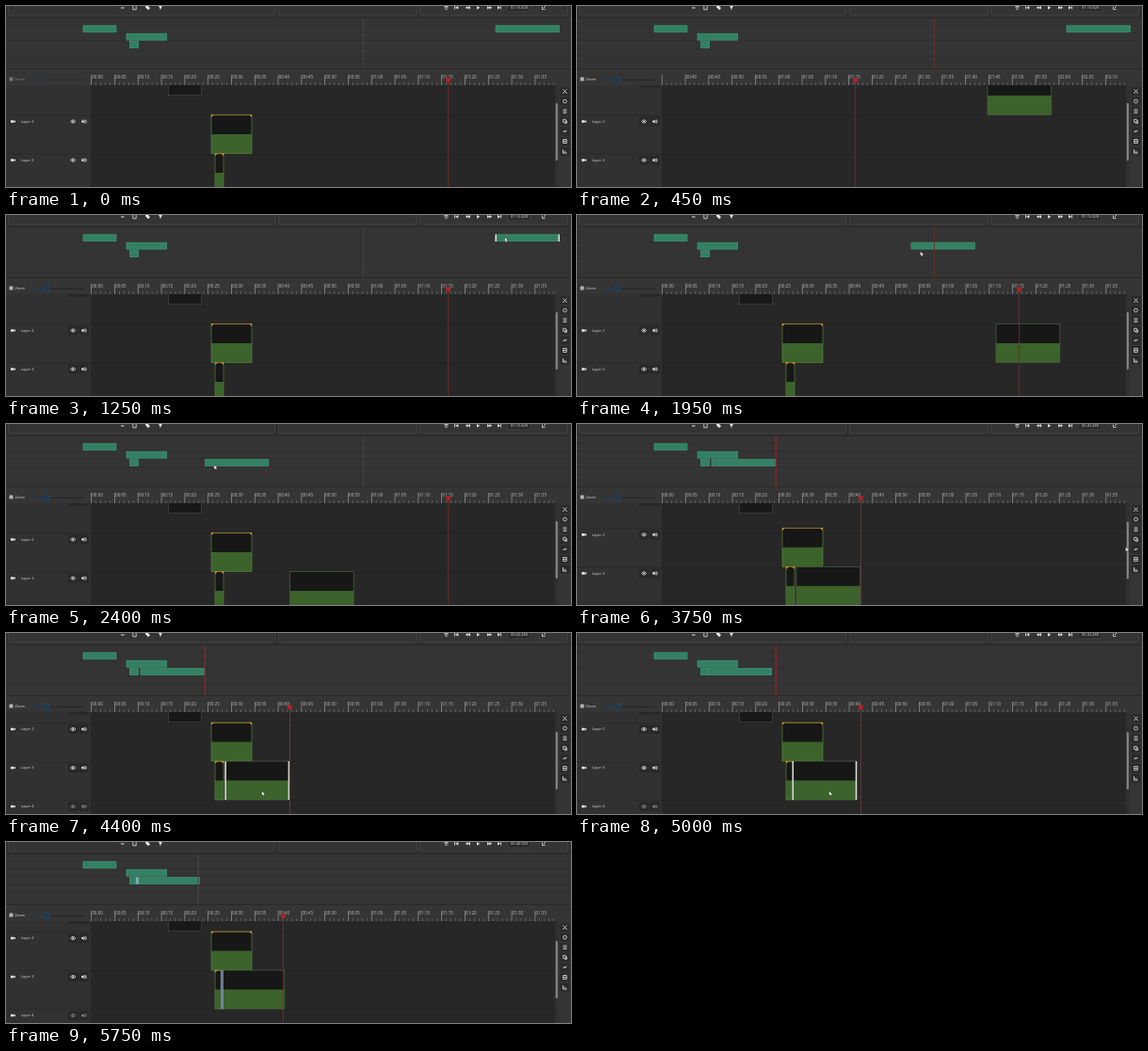
An HTML page that plays this animation: 600 by 192 pixels, repeating every 5850 ms.

```html
<!DOCTYPE html>
<html lang="en">
<head>
<meta charset="utf-8">
<title>Timeline editor</title>
<style>
  html, body { margin: 0; width: 100%; height: 100%; overflow: hidden; background: #353535; }
  svg { display: block; width: 600px; height: 192px; }
  text { font-family: "Open Sans", "Noto Sans", sans-serif; fill: #d8d8d8; font-size: 4px; }
  .tick { font-size: 4.5px; fill: #bdbdbd; }
  .icon { fill: #e4e4e4; }
  .line { fill: none; stroke: #e4e4e4; stroke-width: .8; }
  .mini { fill: #338064; stroke: #41967a; stroke-width: .7; }
  .grip { fill: #dcdfdc; }
  .video { fill: #171717; }
  .audio { fill: #3b632b; }
</style>
</head>
<body>
<svg viewBox="0 0 600 192">
  <defs>
    <clipPath id="stageClip"><rect x="90" y="84" width="493" height="108"/></clipPath>
    <clipPath id="headClip"><rect y="84" width="90" height="108"/></clipPath>
    <clipPath id="rulerClip"><rect x="89.5" y="70" width="493" height="15"/></clipPath>
  </defs>

  <!-- top panels -->
  <rect width="600" height="192" fill="#353535"/>
  <rect width="600" height="12" fill="#303030"/>
  <g fill="#343434" stroke="#4a4a4a" stroke-width=".6">
    <rect x="2.5" y="-6" width="283" height="16" rx="2"/>
    <rect x="289.5" y="-6" width="147" height="16" rx="2"/>
    <rect x="439.5" y="-6" width="157" height="16" rx="2"/>
  </g>
  <rect x="122" y="1.5" width="3.5" height="1" class="icon"/>
  <path d="M134.8 0v3.8h3.4V0" class="line"/>
  <path d="M148 0h3l2 2.2-2 2-3-3z" class="icon"/>
  <path d="M162 0h4l-1.2 2-.8 2.6-.8-2.6z" class="icon"/>
  <g class="icon">
    <path d="M465.500 0h4v.7h-4zM465.500 1.500h4v.7h-4zM466.500 3h2v.7h-2z"/>
    <path d="M476 0h.8v3.500h-.8zM480.300 0v3.500l-3.200-1.700z"/>
    <path d="M490.500 0v3.500l-2.600-1.700zM493 0v3.500l-2.600-1.700z"/>
    <path d="M500 0v3.700l3.300-1.900z"/>
    <path d="M511 0v3.500l2.600-1.700zM513.500 0v3.500l2.600-1.700z"/>
    <path d="M522 0v3.500l3.200-1.700zM525.300 0h.8v3.500h-.8z"/>
  </g>
  <rect x="532.500" y="-3" width="24" height="9" rx="1.500" fill="#2b2b2b" stroke="#474747" stroke-width=".6"/>
  <text id="clock" x="536" y="3">01:16.828</text>
  <path d="M569.500 .500v3h3M571 2l2.500-2.500" class="line"/>

  <!-- overview -->
  <rect y="12" width="600" height="1" fill="#2a2a2a"/>
  <rect y="13" width="600" height="53" fill="#343434"/>
  <g id="lanes" fill="#2c2c2c"></g>
  <rect y="66" width="600" height="1" fill="#292929"/>
  <rect class="mini" x="82" y="20.800" width="35" height="7"/>
  <rect class="mini" x="128" y="29.200" width="42.700" height="7"/>
  <rect class="mini" x="131.500" y="37.500" width="9" height="7"/>
  <g id="mini">
    <rect class="mini" width="67.500" height="7"/>
    <g id="miniGrips" class="grip">
      <rect x="-.5" y="-.3" width="1.500" height="7.600"/>
      <rect x="66.500" y="-.3" width="1.500" height="7.600"/>
    </g>
  </g>
  <rect id="miniMix" x="138" y="37.500" width="2.800" height="7" fill="#82a9b6"/>
  <rect id="miniHead" y="13" width="1" height="53"/>

  <!-- zoom and layer headers -->
  <g id="zoom">
    <rect x="3.500" y="75.500" width="4" height="4" rx=".6" fill="#b4b4b4"/>
    <text x="9.500" y="79.200">Zoom</text>
    <rect x="29" y="77.800" width="54" height="1" fill="#242424"/>
    <rect x="29" y="77.800" width="15" height="1" fill="#1d446c"/>
  </g>
  <circle id="knob" cx="43" cy="78.300" r="3.100" fill="#263747" stroke="#1c4a78" stroke-width=".8"/>
  <g clip-path="url(#headClip)">
    <rect y="84" width="90" height="108" fill="#313131"/>
    <path class="btn" d="M66 84h10.500v2.500H66zM77.500 84H88v2.500H77.500z" fill="#272727"/>
    <g id="heads"></g>
  </g>

  <!-- ruler and timeline -->
  <g clip-path="url(#rulerClip)"><g id="ruler"></g></g>
  <g clip-path="url(#stageClip)">
    <rect x="90" y="84" width="493" height="108" fill="#272727"/>
    <g id="seams" fill="#222"></g>
    <g id="first">
      <rect x="172.500" y="75" width="35" height="19.700" fill="#181818" stroke="#4b4b4b" stroke-width=".6"/>
    </g>
    <g id="world"></g>
  </g>
  <g id="head">
    <rect x="-.5" y="80" width="1" height="112" id="headLine"/>
    <path d="M-2.500 76.500h5v3L0 82l-2.500-2.500z" fill="#b02424"/>
  </g>

  <!-- right side -->
  <rect x="583" y="84" width="4" height="108" fill="#303030"/>
  <rect id="thumb" x="583.700" y="103" width="2.200" height="61" rx="1.100" fill="#858585"/>
  <g id="tools"></g>

  <path id="cursor" d="M0 0v5.200l1.300-1.100.9 1.700.9-.5-.8-1.600h1.600z" fill="#f5f5f5" stroke="#151515" stroke-width=".4"/>
</svg>
<script>
const LOOP = 5850, STEP = 50, ORIGIN = 90.3, MAJOR = 24.8, PITCH = 41, TOP = 74.5;
const $ = id => document.getElementById(id);

function add(parent, tag, attrs, text) {
  const node = document.createElementNS("http://www.w3.org/2000/svg", tag);
  for (const key in attrs) node.setAttribute(key, attrs[key]);
  if (text) node.textContent = text;
  return parent.appendChild(node);
}
const box = (parent, x, y, width, height, attrs) => add(parent, "rect", { x, y, width, height, ...attrs });
const move = (id, x, y) => $(id).setAttribute("transform", `translate(${x} ${y})`);
const show = (id, on) => $(id).setAttribute("visibility", on ? "visible" : "hidden");
const pad = n => String(n).padStart(2, "0");
const layerTop = n => TOP + PITCH * (n - 1);

for (let i = 0; i < 5; i++) box($("lanes"), 0, 20 + i * 8.35, 600, .5);

function header(n) {
  const g = add($("heads"), "g", { transform: `translate(0 ${layerTop(n) + 48 - PITCH})` });
  box(g, 0, -7, 90, .7, { fill: "#272727" });
  add(g, "path", { d: "M5 -1.3h3.300v2.600H5zM8 0l2-1.300v2.600z", class: "icon" });
  add(g, "text", { x: 16, y: 1.4 }, "Layer " + n);
  for (const x of [66, 77.5]) box(g, x, -5, 10.5, 10, { class: "btn", rx: 1, fill: "#282828" });
  const marks = add(g, "g", { opacity: n === 4 ? .5 : 1 });
  add(marks, "path", { d: "M68.500 0q2.700-3.200 5.400 0q-2.700 3.200-5.400 0z", class: "line" });
  add(marks, "circle", { cx: 71.2, cy: 0, r: .9, class: "icon" });
  add(marks, "path", { d: "M80 -.8h1.100l1.500-1.400v4.400L81.100 .8H80z", class: "icon" });
  add(marks, "path", { d: "M83.500 -1.300q1 1.300 0 2.600M84.500 -2q1.500 2 0 4", class: "line", "stroke-width": .5 });
}
// header labels sit 7px below the top seam of each layer
[2, 3, 4].forEach(header);
for (let n = 2; n < 5; n++) box($("seams"), 90, layerTop(n), 493, .7);

const labels = [];
for (let i = 0; i < 30; i++) {
  const x = ORIGIN + i * MAJOR, s = i * 5;
  box($("ruler"), x, 73, .7, 11, { fill: "#9a9a9a" });
  for (let k = 1; k < 5; k++) box($("ruler"), x + k * MAJOR / 5, 81, .5, 3, { fill: "#858585" });
  labels.push(add($("ruler"), "text", { x: x + 1, y: 77, class: "tick" }, pad(Math.floor(s / 60)) + ":" + pad(s % 60)));
}

function clip(width, amber) {
  const g = add($("world"), "g", {});
  box(g, 0, 0, width, 20.5, { class: "video" });
  box(g, 0, 20.5, width, 20.5, { class: "audio" });
  box(g, 0, 0, width, 41, { fill: "none", stroke: amber ? "#57803a" : "#4d6242", "stroke-width": .7 });
  if (amber) {
    box(g, 0, -.2, width, .8, { fill: "#9a7b2a" });
    add(g, "path", { d: `M0 0h2.600L0 2.600zM${width} 0v2.600l-2.600-2.600z`, fill: "#ee9826" });
  }
  return g;
}
clip(43, true).setAttribute("transform", `translate(218 ${layerTop(2)})`);
clip(9, true).setAttribute("transform", `translate(222 ${layerTop(3)})`);
const big = clip(67.8, false);
big.id = "big";
const grips = add(big, "g", { id: "grips", class: "grip" });
for (const x of [-.6, 66.6]) box(grips, x, 0, 1.5, 41);
box($("world"), 228, layerTop(3), 3, 41, { id: "mix", fill: "#7d8fae", opacity: .8 });

const glyphs = [
  "M-2-2L2 2M2-2L-2 2M-2 2h.8M1.200 2H2",
  "M-1.900 0a1.900 1.900 0 1 0 3.800 0a1.900 1.900 0 1 0-3.800 0",
  "M-2-1.800H2M-2 0H2M-2 1.800H2",
  "M-1.800-2H.8V1H-1.800zM-.5 2H2V-.8",
  "M-2 1l2-2M0 1l2-2M-1 .5L1-.5",
  "M-1.800-2H1.800V2H-1.800zM-1.800 0H1.800",
  "M-2-2V2H2M-.5 1.500V-.5M1 1.500V.5"
];
glyphs.forEach((d, i) => {
  const y = 90.5 + i * 10.6;
  box($("tools"), 588.5, y - 4.5, 10, 9, { rx: 1, fill: "#2a2a2a" });
  add($("tools"), "path", { d, class: "line", transform: `translate(593.500 ${y})` });
});

// each key: [time, value, value...]
function track(keys, t) {
  let i = 0;
  while (i < keys.length - 1 && keys[i + 1][0] <= t) i++;
  const a = keys[i], b = keys[i + 1];
  if (!b || t <= a[0]) return a.slice(1);
  const p = (t - a[0]) / (b[0] - a[0]);
  return a.slice(1).map((v, k) => v + (b[k + 1] - v) * p);
}
const scrollX = [[100, 0], [200, 40], [400, 174], [750, 174], [900, 80], [1050, 0]];
const scrollY = [[3700, 0], [3900, 20.5]];
const dragX = [[1300, 520], [1500, 498], [1900, 386], [1950, 355], [2200, 270], [2500, 182], [2650, 147],
  [2950, 147], [3100, 141], [3150, 143], [4500, 143], [5150, 138]];
const pointer = [[1000, 531, 52], [1200, 531, 26], [1300, 531, 26], [1500, 509, 29], [1900, 397, 40],
  [1950, 366, 41], [2200, 281, 43], [2500, 193, 47], [2650, 158, 47], [2850, 166, 42], [2950, 166, 42],
  [3100, 160, 42], [3150, 162, 42], [3300, 162, 42], [3400, 211, 52], [3450, 211, 52], [3700, 584, 132],
  [3900, 584, 135], [4300, 273, 170], [4500, 273, 170], [5150, 268, 170], [5300, 268, 170], [5550, 332, 44.5]];

function draw(t) {
  const [sx] = track(scrollX, t), [sy] = track(scrollY, t);
  const [mx] = track(dragX, t), [cx, cy] = track(pointer, t);
  const layer = t < 1700 ? 1 : t < 2350 ? 2 : 3;
  const late = t >= 5150, mid = t >= 3400 && !late;
  const head = late ? 204 : mid ? 211 : 379.3;

  move("ruler", -sx, 0);
  labels.forEach((l, i) => l.setAttribute("visibility", ORIGIN + i * MAJOR - sx < 90 ? "hidden" : "visible"));
  move("first", -sx, 0);
  move("world", -sx, -sy);
  move("seams", 0, -sy);
  move("heads", 0, -sy);
  move("thumb", 0, sy * .1);
  move("big", mx + 90, layerTop(layer));
  move("mini", mx, 20.8 + (layer - 1) * 8.35);

  move("head", head + 90.4 - sx, 0);
  $("headLine").setAttribute("fill", late ? "#8e2020" : mid ? "#653c3c" : "#702a2a");
  $("miniHead").setAttribute("x", head - .3);
  $("miniHead").setAttribute("fill", late ? "#4c4848" : mid ? "#a82424" : "#623636");
  $("clock").textContent = late ? "00:40.960" : mid ? "00:42.480" : "01:16.828";

  show("miniGrips", t >= 1150 && t < 1350 || t >= 2750 && t < 3000);
  show("grips", t >= 4200 && t < 5350);
  show("mix", late);
  show("miniMix", late);
  show("knob", t >= 150);
  $("zoom").setAttribute("opacity", t < 150 ? .5 : 1);
  document.querySelectorAll(".btn").forEach(b => b.setAttribute("opacity", t < 150 ? 0 : 1));
  show("cursor", t >= 1050 && t < 5750);
  move("cursor", cx - 1.5, cy - 2.5);
}

const start = performance.now();
function tick() {
  const t = (performance.now() - start) % LOOP;
  draw(Math.floor(t / STEP) * STEP);
  requestAnimationFrame(tick);
}
draw(0);
requestAnimationFrame(tick);
</script>
</body>
</html>
```
